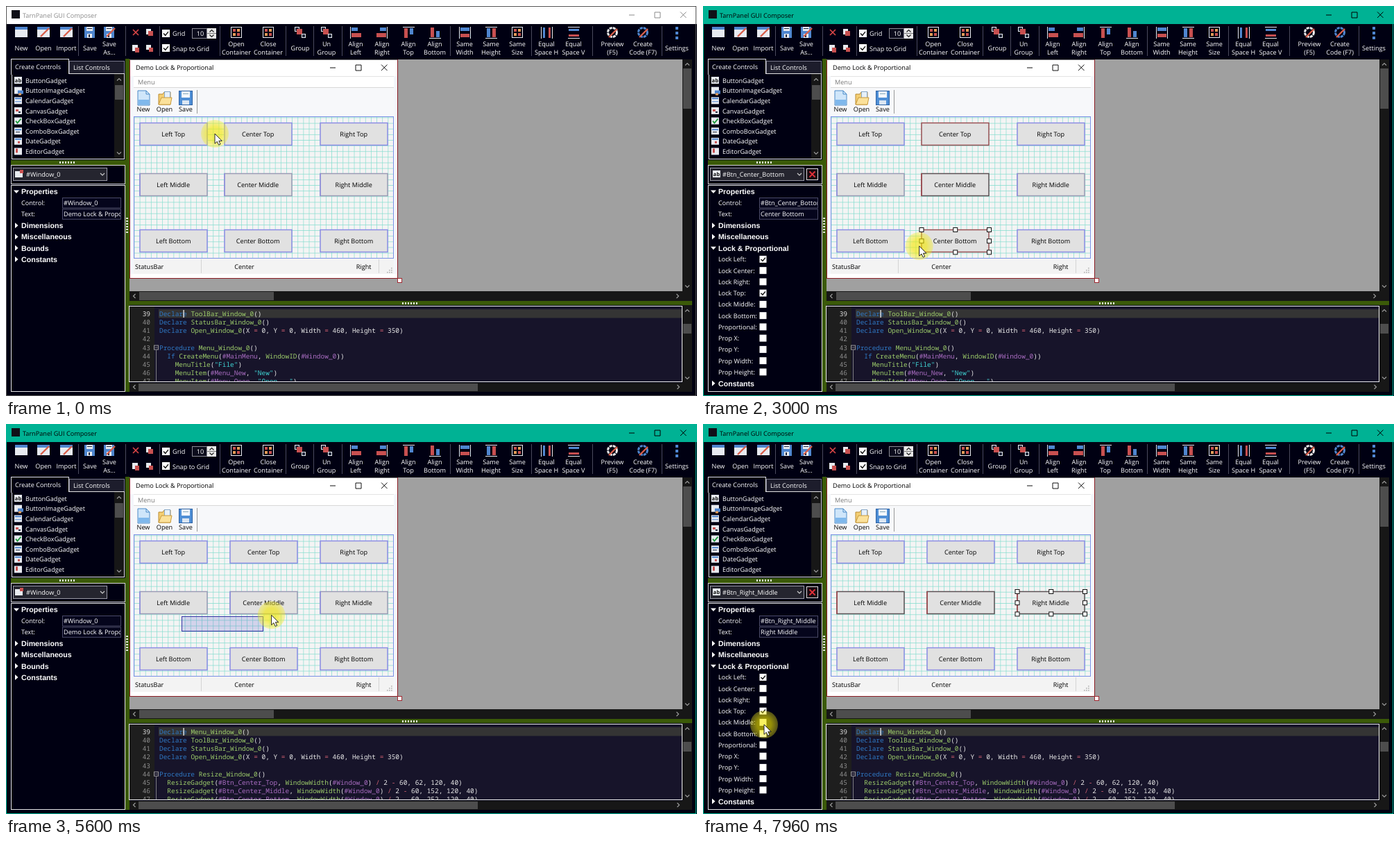
Write an HTML page that moves like this. It is 996 px wide and 562 px high and loops after 8 s.

```html
<!DOCTYPE html>
<html lang="en">
<head>
<meta charset="utf-8">
<title>GUI designer</title>
<style>
html, body { margin: 0; width: 100%; height: 100%; overflow: hidden; background: #000010; }
svg { display: block; width: 100%; height: 100%; }
text { font: 500 9.15px "Open Sans", sans-serif; white-space: pre; text-rendering: geometricPrecision; }
.bold { font: bold 10.65px "Liberation Sans", sans-serif; }
.code { font: 9.46px "Noto Sans Mono", monospace; }
.tag { font-size: 7.5px; font-weight: bold; }
</style>
</head>
<body>
<svg id="stage" viewBox="0 0 996 562" preserveAspectRatio="none">
  <defs>
    <pattern id="grid" x="184.5" y="160.5" width="8.13" height="8.13" patternUnits="userSpaceOnUse">
      <path d="M8.13 0H0V8.13" fill="none" stroke="#7fdccd" stroke-width="1.3"/>
    </pattern>
    <radialGradient id="halo">
      <stop offset=".5" stop-color="#f4e800" stop-opacity=".62"/>
      <stop offset="1" stop-color="#f4ec20" stop-opacity=".34"/>
    </radialGradient>
    <clipPath id="codeClip"><rect x="179" y="433" width="795" height="108"/></clipPath>
    <clipPath id="fieldClip"><rect x="81" y="276" width="84" height="32"/></clipPath>
  </defs>
  <g id="base"></g>
  <g id="scene"></g>
  <rect id="band" fill="#4040c0" fill-opacity=".18" stroke="#3434a4"/>
  <g id="pointer">
    <circle r="20" fill="url(#halo)"/>
    <path d="M0 0V14.3L3.3 11.3 5.6 16.2 8 15.1 5.8 10.4H10.2Z" fill="#fff" stroke="#111" stroke-width=".9"/>
  </g>
</svg>
<script>
const LOOP = 8000;
const $ = id => document.getElementById(id);
const WHITE = '#fff', DARK = '#000012', SPLIT = '#3b5a08', EDITOR = '#17142a';

// Drawing helpers, each returns markup
function box(x, y, w, h, fill = 'none', stroke) {
  return stroke
    ? `<rect x="${x + .5}" y="${y + .5}" width="${w - 1}" height="${h - 1}" fill="${fill}" stroke="${stroke}"/>`
    : `<rect x="${x}" y="${y}" width="${w}" height="${h}" fill="${fill}"/>`;
}
function path(d, stroke, width = 1, fill = 'none') {
  return `<path d="${d}" fill="${fill}" stroke="${stroke}" stroke-width="${width}"/>`;
}
function txt(x, y, s, fill = WHITE, anchor = 'start', cls = '') {
  const safe = s.replace(/&/g, '&amp;').replace(/</g, '&lt;');
  return `<text x="${x}" y="${y}" fill="${fill}" text-anchor="${anchor}" class="${cls}">${safe}</text>`;
}
const mid = (x, y, s, fill) => txt(x, y, s, fill, 'middle');

function chevron(x, y, dir, color = '#999') {
  const turn = { up: 0, right: 90, down: 180, left: 270 }[dir];
  return `<path transform="translate(${x} ${y}) rotate(${turn})" d="M-3 1.5L0 -1.5L3 1.5" fill="none" stroke="${color}" stroke-width="1.2"/>`;
}
function check(x, y, on, size = 10) {
  return box(x, y, size, size, '#fff') +
    (on ? path(`M${x + 2} ${y + size / 2}l${size * .25} ${size * .26}l${size * .38} ${-size * .48}`, '#111', 1.4) : '');
}
function dots(x, y, vertical) {
  let s = '';
  for (let i = 0; i < 6; i++) s += vertical ? box(x, y + i * 4, 3, 2, '#e4e8dc') : box(x + i * 4, y, 2, 3, '#e4e8dc');
  return s;
}
function windowKeys(x, y, gap, color) {
  return path(`M${x - 4} ${y + .5}h8M${x + gap - 4} ${y - 3.5}h8v8h-8zM${x + 2 * gap - 4} ${y - 4}l8.5 8.5m0-8.5l-8.5 8.5`, color);
}

// Icon from "colour x y w h" pieces around a centre
const INK = { w: '#e8ebf0', r: '#c85050', b: '#4f86cf', d: '#20283c', o: '#e09a55' };
function icon(cx, cy, parts) {
  return parts.split(';').map(p => {
    const [c, x, y, w, h] = p.trim().split(' ');
    return box(cx + +x, cy + +y, w, h, INK[c]);
  }).join('');
}
const pencil = (x, y) => path(`M${x - 6} ${y + 6}L${x + 6} ${y - 6}`, '#d9604c', 2.4);

function toolbar() {
  const page = 'w -9 -8 18 15;b -9 -8 18 4';
  const disk = 'b -8 -8 15 16;w -5 -8 9 6;d -4 -6 7 1;w -4 2 7 6;d -2 3 2 4';
  const group = 'w -8 -8 7 7;d -7 -7 5 5;r -5 -5 8 8;w 2 2 6 6;d 3 3 4 4';
  const frame = 'w -8 -8 16 1;w -8 7 16 1;w -8 -8 1 16;w 7 -8 1 16;r -5 -5 4 4;o 1 -5 4 4;o -5 1 4 4;r 1 1 4 4';
  const left = 'w -8 -8 1 17;b -6 -7 9 5;r -6 1 14 6';
  const right = 'w 7 -8 1 17;b -3 -7 9 5;r -8 1 14 6';
  const top = 'w -8 -8 17 1;r -6 -6 5 14;b 2 -6 5 9';
  const bottom = 'w -8 8 17 1;r -6 -7 5 14;b 2 -2 5 9';
  const wide = 'w -8 -8 1 17;w 8 -8 1 17;b -6 -7 13 5;r -6 2 13 5';
  const tall = 'w -8 -8 17 1;w -8 8 17 1;b -6 -6 5 13;r 2 -6 5 13';
  const across = 'w -8 -8 1 17;w 8 -8 1 17;b -5 -7 3 15;r 3 -7 3 15';
  const down = 'w -8 -8 17 1;w -8 8 17 1;b -7 -5 15 3;r -7 3 15 3';
  const items = [
    [22, 'New', page], [54, 'Open', page, 1], [87, 'Import', page, 1], [121, 'Save', disk], [149, 'Save|As...', disk, 1],
    [332, 'Open|Container', frame], [378, 'Close|Container', frame], [424, 'Group', group], [462, 'Un|Group', group],
    [504, 'Align|Left', left], [542, 'Align|Right', right], [580, 'Align|Top', top], [618, 'Align|Bottom', bottom],
    [661, 'Same|Width', wide], [699, 'Same|Height', tall], [737, 'Same|Size', frame],
    [779, 'Equal|Space H', across], [818, 'Equal|Space V', down],
    [874, 'Preview|(F5)', ''], [918, 'Create|Code (F7)', ''], [967, 'Settings', 'b -2 -8 4 4;b -2 -1 4 4;b -2 6 4 4']
  ];
  let s = '';
  for (const [x, label, art, pen] of items) {
    if (art) s += icon(x, 38, art);
    else s += `<circle cx="${x}" cy="38" r="6.5" fill="none" stroke="${x < 900 ? '#eee' : INK.b}" stroke-width="3" stroke-dasharray="4 1.1"/>` + pencil(x + 1, 39);
    if (pen) s += pencil(x + 2, 38);
    const rows = label.split('|');
    rows.forEach((row, i) => s += mid(x, rows.length > 1 ? 57.5 + 12 * i : 63.5, row));
  }
  for (const x of [104, 172, 221, 308, 403, 443, 484, 640, 757, 845, 945]) s += box(x, 29, 1, 43, '#4a4a5c');
  s += path('M183 34l8 8m0-8l-8 8', '#e04848', 1.6) + icon(207, 39, 'w -5 -6 7 8;r -2 -3 7 7');
  s += icon(187, 62, 'w -5 -6 8 9;r -1 -2 6 7') + icon(207, 62, 'w -5 -6 7 7;r -1 -2 6 6');
  s += check(225, 34, true, 11) + txt(240, 43, 'Grid') + check(225, 55, true, 11) + txt(240, 64.5, 'Snap to Grid');
  s += box(268, 32, 22, 15, '#0c0c1c', '#8a8a94') + mid(280, 43, '10') + box(290, 32, 13, 15, '#e8e8e8') + box(290, 39, 13, 1, '#777');
  return s + chevron(296.5, 36, 'up', '#222') + chevron(296.5, 43, 'down', '#222');
}

function controlList() {
  const names = ['Button', 'ButtonImage', 'Calendar', 'Canvas', 'CheckBox', 'ComboBox', 'Date', 'Editor'];
  const art = ['', 'b 0 0 8 5;o 1 4 4 3', 'b -4 -4 9 2;b -4 1 9 1', 'r -3 -2 4 3;d 1 1 3 2', '', 'b -4 -3 9 2;d -3 1 6 1', 'b -4 -4 9 2;r 0 0 3 3', 'r -3 -4 3 6'];
  let s = box(7, 76, 84, 23, DARK, '#e0e0e0') + box(91, 79, 80, 19, '#1d1d2c', '#77778a') + box(8, 97, 163, 124, DARK, '#e0e0e0') + box(8, 96, 82, 3, DARK);
  s += txt(13, 90.5, 'Create Controls') + txt(97, 92, 'List Controls');
  names.forEach((n, i) => {
    const y = 107 + i * 14.64;
    s += icon(17, y, 'w -5 -5 11 10' + (art[i] && ';' + art[i]));
    if (i == 0) s += txt(17.5, y + 3, 'ab', '#111', 'middle', 'tag');
    if (i == 4) s += path(`M14 ${y}l2.5 3l5-6`, '#1c9a3a', 1.8);
    s += txt(28, y + 3.6, n + 'Gadget');
  });
  return s + box(156, 98, 14, 122, '#171717') + box(157, 114, 12, 21, '#4d4d4d') + chevron(163, 106, 'up') + chevron(163, 212, 'down');
}

function preview() {
  let s = box(178, 77, 797, 334, '#a0a0a0') + box(178, 77, 387, 316, '#fff', '#8a1c24') + box(178, 77, 386, 1, '#777') + box(179, 78, 385, 313, '#fff');
  s += txt(187, 91.7, 'Demo Lock & Proportional', '#000') + windowKeys(471, 88.5, 37, '#111');
  s += box(179, 101, 5, 285, '#f4f7fc') + box(559, 101, 5, 285, '#f4f7fc');
  s += box(184, 101, 375, 1, '#e4e4e4') + txt(190, 113, 'Menu', '#777') + box(184, 117, 375, 1, '#d8d8d8') + box(184, 118, 375, 42, '#f7f8fa');
  s += path('M190 122h12l5 5v16h-17z', '#4a8ac8', 1, '#cfe6fa') + path('M202 122v5h5', '#4a8ac8') + box(191, 135, 15, 7, '#7fb8ec');
  s += path('M220 142v-15h6l2-3h9v18z', '#b98a30', 1, '#f4cf74') + box(228, 123, 9, 10, '#e6f0fa', '#88a8c8') + path('M220 142l4-10h15l-2 10z', '#c89a3c', 1, '#fbe19a');
  s += box(249, 122, 20, 21, '#4f8fd6', '#2d62a4') + box(253, 123, 12, 9, '#f4f8fc') + box(254, 136, 10, 6, '#dbe6f2') + box(255, 126, 8, 1, '#8ab');
  s += mid(198, 152, 'New', '#000') + mid(228.5, 152, 'Open', '#000') + mid(259, 152, 'Save', '#000') + box(275, 121, 1, 34, '#999');
  s += box(184, 160, 375, 204, '#f4f4f4') + box(184, 160, 375, 204, 'url(#grid)') + box(184, 159, 375, 205, 'none', '#7c90e6');
  s += box(184, 364, 375, 22, '#f3f3f3') + box(281, 365, 1, 20, '#d4d4d4') + box(537, 365, 1, 20, '#d4d4d4');
  s += txt(186, 378.5, 'StatusBar', '#000') + mid(343.5, 378.5, 'Center', '#000') + txt(526.5, 378.5, 'Right', '#000', 'end');
  for (let i = 0; i < 3; i++) for (let j = 2 - i; j < 3; j++) s += box(549 + j * 3, 377 + i * 3, 1.6, 1.6, '#b4b4b4');
  return s + box(564, 392, 7, 7, '#fff', '#a02830');
}

function drawBase() {
  let s = box(0, 0, 996, 562, DARK) + toolbar() + controlList();
  s += box(172, 76, 6, 480, SPLIT) + dots(173, 305, true) + box(7, 222, 165, 7, SPLIT) + dots(77, 224) + box(178, 425, 811, 6, SPLIT) + dots(571, 427);
  s += preview();
  s += box(975, 77, 14, 348, '#171717') + box(976, 90, 12, 58, '#4d4d4d') + chevron(982, 84, 'up') + chevron(982, 404, 'down');
  s += box(178, 411, 797, 14, '#171717') + box(192, 412, 194, 12, '#4d4d4d') + chevron(185, 418, 'left') + chevron(968, 418, 'right');
  s += box(177, 432, 798, 110, EDITOR, '#eee') + box(178, 433, 36, 108, '#1e1e1e') + box(220, 437, 754, 12.5, '#343434');
  s += box(975, 431, 14, 125, '#171717') + chevron(982, 439, 'up') + chevron(982, 536, 'down');
  s += box(178, 543, 797, 13, '#171717') + box(191, 544, 489, 11, '#4d4d4d') + chevron(185, 549, 'left') + chevron(969, 549, 'right');
  s += box(7, 229, 165, 28, DARK, '#d8d8d8') + box(7, 258, 165, 298, DARK, '#e6e6e6');
  return s;
}

// Code editor
const HUES = ['#3fd0d0', '#a86cc0', '#2f78c4', '#9ccb6a', '#d06070'];
const TOKENS = /("[^"]*")|(#\w+)|\b(Declare|Procedure|If)\b|(\w+(?=\())|([\/\-=])/g;
const paint = line => line.replace(TOKENS, (m, ...g) =>
  `<tspan fill="${HUES[g.slice(0, 5).findIndex(v => v !== undefined)]}">${m}</tspan>`);

const DECLARE = ['ToolBar_Window_0()', 'StatusBar_Window_0()', 'Open_Window_0(X = 0, Y = 0, Width = 460, Height = 350)'].map(v => 'Declare ' + v);
const CODE = [
  [...DECLARE, '', 'Procedure Menu_Window_0()', '  If CreateMenu(#MainMenu, WindowID(#Window_0))',
    '    MenuTitle("File")', '    MenuItem(#Menu_New, "New")', '    MenuItem(#Menu_Open, "Open...")'],
  ['Declare Menu_Window_0()', ...DECLARE, '', 'Procedure Resize_Window_0()',
    ...[['Top', 62], ['Middle', 152], ['Bottom', 252]].map(([n, y]) =>
      `  ResizeGadget(#Btn_Center_${n}, WindowWidth(#Window_0) / 2 - 60, ${y}, 120, 40)`)]
];
function editor(resized, thumb) {
  let s = '';
  CODE[resized].forEach((line, i) => {
    const y = 446.8 + i * 12.2;
    s += txt(208, y, '' + (39 + i), i ? '#8c8c8c' : '#e0e0e0', 'end', 'code');
    s += `<text x="221" y="${y}" fill="#e8e8e8" class="code">${paint(line)}</text>`;
    if (line.startsWith('Proc')) s += box(213, y - 7, 7, 7, EDITOR, '#999') + path(`M214.5 ${y - 3.5}h4M216.5 ${y}V542`, '#999', .8);
  });
  return `<g clip-path="url(#codeClip)">${s}${box(255.5, 438, 1.2, 11, '#fff')}</g>` + box(976, thumb, 12, 14, '#4d4d4d');
}

// Property panel
const LOCKS = ['Lock Left', 'Lock Center', 'Lock Right', 'Lock Top', 'Lock Middle', 'Lock Bottom', 'Proportional', 'Prop X', 'Prop Y', 'Prop Width', 'Prop Height'];
function panel(name, locked) {
  const id = name ? '#Btn_' + name.replace(' ', '_') : '#Window_0';
  let s = box(10, 233, 136, 19, '#25252f', '#9a9aa4') + chevron(139, 242.5, 'down', '#ccc') + txt(name ? 28 : 29, 246, id);
  s += name
    ? icon(19, 242, 'w -5 -5 11 10') + txt(19.5, 245, 'ab', '#111', 'middle', 'tag') +
      box(149, 234, 17, 17, '#1a0a12', '#ddd') + path('M153.5 238.5l8 8m0-8l-8 8', '#e03038', 1.9)
    : icon(19, 242, 'w -6 -4 11 9;r 1 -6 5 5');
  let y = 267.6;
  const step = 16.25;
  const head = (label, open) => {
    s += txt(22, y + 3.7, label, '#fff', 'start', 'bold') +
      path(open ? `M11 ${y - 2}h8l-4 4.5z` : `M13 ${y - 4}v8l4.5-4z`, 'none', 0, '#fff');
    y += step;
  };
  head('Properties', true);
  [['Control:', id], ['Text:', name || 'Demo Lock & Proportional']].forEach(([label, value]) => {
    s += txt(22, y + 3, label) + box(81, y - 7.8, 85, 15.5, '#05051c', '#4c4c68') + `<g clip-path="url(#fieldClip)">${txt(83, y + 3, value)}</g>`;
    y += step;
  });
  head('Dimensions');
  head('Miscellaneous');
  if (name) {
    head('Lock & Proportional', true);
    LOCKS.forEach((label, i) => {
      s += txt(22, y + 3.3, label + ':') + check(81.5, y - 5.2, i == 3 || i == locked);
      y += step;
    });
  } else head('Bounds');
  head('Constants');
  return s;
}

// Form buttons; column or row 1 may be selected, the last one carries handles
function buttons(sel, shift) {
  let s = '';
  ['Top', 'Middle', 'Bottom'].forEach((v, r) => ['Left', 'Center', 'Right'].forEach((h, c) => {
    const x = [192.5, 314.5 + shift, 452.5][c], y = [168, 241, 322][r];
    const on = sel == 'col' ? c == 1 : sel == 'row' && r == 1;
    const edge = on ? (r == 1 ? '#5c5054' : '#9a5054') : (r == 1 ? '#9a9ab4' : '#8c8ce4');
    s += `<rect x="${x + .5}" y="${y + .5}" width="97" height="32" fill="#e1e1e1" stroke="${edge}" stroke-width="1.5"/>`;
    if (r == 1) s += path(`M${x + .5} ${y}v33`, on ? '#a84448' : '#8c8ce4', 1.4);
    s += mid(x + 48.7, y + 19.6, h + ' ' + v, '#000');
    if (on && (sel == 'col' ? r : c) == 2)
      for (let i = 0; i < 9; i++) if (i != 4) s += box(x - 3 + (i % 3) * 48.75, y - 3 + Math.floor(i / 3) * 16.2, 7, 7, '#fff', '#111');
  }));
  return s;
}

function titleBar(active) {
  const ink = active ? '#000' : '#8a8a8a';
  return box(0, 0, 996, 26, active ? '#00b294' : '#fff') + box(0, 0, 995, 562, 'none', active ? '#00b294' : '#555') +
    box(8, 6, 12, 12, '#101018') + txt(24, 16.6, 'TarnPanel GUI Composer', ink) + windowKeys(902, 12.5, 37, ink);
}

// Pointer moves: start, end, dx, dy, time warp
const MOVES = [
  [630, 1270, 37, 13, 1], [1285, 1960, 0, 145, .5], [2800, 3755, -250, 37, 1], [4385, 4860, 166, -80, 1],
  [5060, 6060, 228, -42, 1], [6860, 7960, -394, 176, 1.18]
];
function pointerAt(t) {
  let x = 301, y = 184;
  for (const [a, b, dx, dy, warp] of MOVES) {
    const u = Math.min(1, Math.max(0, (t - a) / (b - a)));
    const p = (1 - Math.cos(Math.PI * u ** warp)) / 2;
    x += dx * p;
    y += dy * p;
  }
  return [x, y];
}

let lastKey = '';
function render(t) {
  const within = (a, b) => t >= a && t < b;
  const sel = within(2200, 5095) ? 'col' : t >= 6460 ? 'row' : '';
  const name = within(2360, 5130) ? 'Center Bottom' : t >= 6630 ? 'Right Middle' : '';
  const locked = within(4200, 5130) ? 1 : 0;
  const shift = t >= 4060 ? 8 : 0;
  const resized = t >= 4230 ? 1 : 0;
  const thumb = within(4130, 4230) ? 516 : 458;
  const active = t >= 630;

  const key = [sel, name, locked, shift, resized, thumb, active].join();
  if (key != lastKey) {
    $('scene').innerHTML = titleBar(active) + panel(name, locked) + buttons(sel, shift) + editor(resized, thumb);
    lastKey = key;
  }

  const [x, y] = pointerAt(t);
  $('pointer').setAttribute('transform', `translate(${x.toFixed(1)} ${y.toFixed(1)})`);

  const drag = within(660, 2200) ? [300.5, 183.5] : within(5095, 6460) ? [253.5, 298.5] : null;
  const band = $('band');
  band.style.display = drag ? '' : 'none';
  if (drag) {
    const [px, py] = pointerAt(t - 33);
    const bx = Math.round(px) - .5, by = Math.round(py) + .5;
    band.setAttribute('x', Math.min(bx, drag[0]));
    band.setAttribute('y', Math.min(by, drag[1]));
    band.setAttribute('width', Math.abs(bx - drag[0]));
    band.setAttribute('height', Math.abs(by - drag[1]));
  }
}

$('base').innerHTML = drawBase();
const start = performance.now();
function tick() {
  render((performance.now() - start) % LOOP);
  requestAnimationFrame(tick);
}
tick();
</script>
</body>
</html>
```
